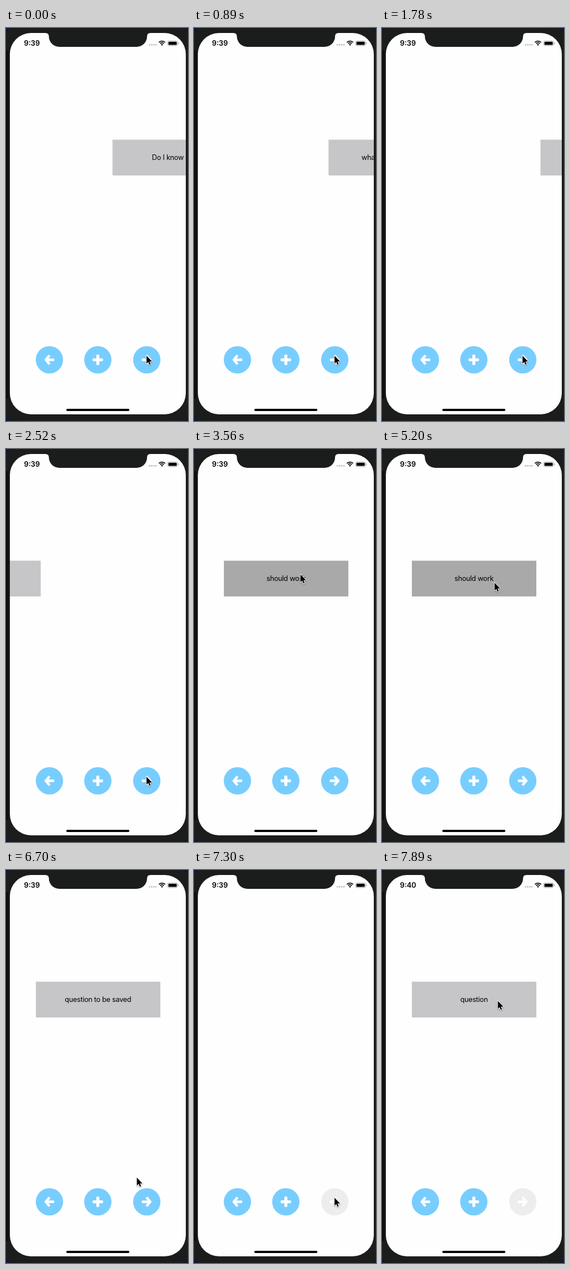
Animation of 329x709 px, one loop 8000 ms. Source, as an HTML page with a canvas:

```html
<!DOCTYPE html>
<html lang="en">
<head>
<meta charset="utf-8">
<title>Flash cards</title>
<style>
html, body { margin: 0; width: 100%; height: 100%; overflow: hidden; background: #1a1c1b; }
canvas { display: block; width: 329px; height: 709px; }
</style>
</head>
<body>
<canvas id="stage"></canvas>
<script>
const W = 329, H = 709, LOOP = 8000;
const canvas = document.getElementById('stage');
const ctx = canvas.getContext('2d');
const dpr = window.devicePixelRatio || 1;
canvas.width = W * dpr;
canvas.height = H * dpr;

const FONT = 'Inter, Roboto, sans-serif';
const BLUE = '#78cdff', GREY = '#ededed', WHITE = '#fefefe';
const REST_X = 54, TRAVEL = 318, SLIDE = 300;

const cards = ['Do I know you', 'what is your name', 'how are you', 'question to be saved', 'question'];
const ANSWER = 'should work';
const clicks = [455, 1370, 2340, 6950];
// Each tap: press time, time the card flips
const taps = [[3410, 3410], [4010, 4160], [4900, 5050], [5800, 5950]];
// Cursor tip: time, x, y
const path = [
  [0, 253.5, 590.5], [2750, 253.5, 590.5], [3080, 192, 225.5], [3560, 192, 225.5],
  [4250, 203, 240.5], [6130, 203, 240.5], [6690, 236, 554], [6850, 253.5, 590.5],
  [7400, 253.5, 590.5], [7850, 209, 235.5]
];

// The picture advances about every 150 ms, with a few shorter holds
const shortHolds = [0, 10, 14, 20, 28, 50];
const ticks = [];
for (let i = 0, t = 0; t < LOOP; i++) {
  ticks.push(t);
  t += shortHolds.includes(i) ? 140 : 150;
}
const hold = t => ticks.filter(s => s <= t).pop();

const clamp = v => Math.min(1, Math.max(0, v));
const ease = v => v < 0.5 ? 2 * v * v : 1 - 2 * (1 - v) * (1 - v);

function box(x, y, w, h, r, fill) {
  ctx.beginPath();
  ctx.roundRect(x, y, w, h, r);
  ctx.fillStyle = fill;
  ctx.fill();
}

function disc(x, y, r, fill) {
  ctx.beginPath();
  ctx.arc(x, y, r, 0, Math.PI * 2);
  ctx.fillStyle = fill;
  ctx.fill();
}

function poly(points, dx = 0, dy = 0) {
  ctx.beginPath();
  points.forEach(([x, y]) => ctx.lineTo(x + dx, y + dy));
}

function drawPhone() {
  ctx.fillStyle = '#0d1836';
  ctx.fillRect(0, 0, W, H);
  box(-4, -4, W + 8, H + 8, 26, '#1b1d1c');
  const side = ctx.createLinearGradient(0, 0, 7, 0);
  side.addColorStop(0, '#060707');
  side.addColorStop(1, '#1b1d1c');
  ctx.fillStyle = side;
  ctx.fillRect(0, 40, 7, H - 80);
  box(7, 9, 318, 688, 38, WHITE);
}

function drawNotch() {
  ctx.beginPath();
  ctx.moveTo(71, 8);
  ctx.lineTo(71, 9);
  ctx.quadraticCurveTo(77.5, 9, 77.5, 15);
  ctx.arcTo(77.5, 34, 97, 34, 19);
  ctx.lineTo(236, 34);
  ctx.arcTo(255, 34, 255, 15, 19);
  ctx.quadraticCurveTo(255, 9, 261, 9);
  ctx.lineTo(261, 8);
  ctx.fillStyle = '#1b1d1c';
  ctx.fill();
}

function drawStatus(t) {
  ctx.fillStyle = '#000';
  ctx.font = '600 12.8px ' + FONT;
  ctx.letterSpacing = '0px';
  ctx.textAlign = 'left';
  ctx.fillText(t < 7400 ? '9:39' : '9:40', 32.5, 32);

  for (let i = 0; i < 4; i++) disc(259.4 + i * 3.9, 30.3, 1.5, '#c2c2c2');

  ctx.strokeStyle = '#000';
  ctx.lineWidth = 1.8;
  ctx.lineCap = 'butt';
  for (const r of [8, 5]) {
    ctx.beginPath();
    ctx.arc(282, 31.6, r, -Math.PI * 0.75, -Math.PI * 0.25);
    ctx.stroke();
  }
  ctx.beginPath();
  ctx.moveTo(282, 32);
  ctx.arc(282, 31.6, 2.6, -Math.PI * 0.75, -Math.PI * 0.25);
  ctx.fillStyle = '#000';
  ctx.fill();

  ctx.beginPath();
  ctx.roundRect(292.2, 23.3, 17.8, 8.6, 2.4);
  ctx.strokeStyle = '#a5a5a5';
  ctx.lineWidth = 0.9;
  ctx.stroke();
  box(293.6, 24.7, 15, 5.8, 1.2, '#000');
  box(310.9, 26.1, 1.3, 3, 0.7, '#a5a5a5');
}

function cardState(t) {
  let index = 0, x = REST_X + TRAVEL * (1 - ease(clamp((t + 160) / SLIDE)));
  for (const c of clicks) {
    if (t < c) break;
    const leaving = t < c + SLIDE;
    if (!leaving) index++;
    x = leaving
      ? REST_X - TRAVEL * ease((t - c) / SLIDE)
      : REST_X + TRAVEL * (1 - ease(clamp((t - c - SLIDE) / SLIDE)));
  }
  const flipped = taps.filter(tap => tap[1] <= t).length % 2 === 1;
  const pressed = taps.some(([down, flip]) => t >= down && t < flip + 140);
  return { x, flipped, text: flipped ? ANSWER : cards[index], alpha: pressed ? 0.6 : 1 };
}

function drawCard(t) {
  const card = cardState(t);
  ctx.save();
  ctx.beginPath();
  ctx.rect(7, 190, 318, 90);
  ctx.clip();
  ctx.globalAlpha = card.alpha;
  ctx.fillStyle = card.flipped ? '#a9a9a9' : '#c6c6c8';
  ctx.fillRect(card.x, 201.5, 225, 64.5);
  ctx.fillStyle = '#000';
  ctx.font = '400 12.8px ' + FONT;
  ctx.letterSpacing = '-0.3px';
  ctx.textAlign = 'center';
  ctx.fillText(card.text, card.x + 112.3, 238);
  ctx.restore();
}

function drawArrow(x, y, dir) {
  ctx.save();
  ctx.translate(x, y);
  ctx.scale(dir, 1);
  ctx.strokeStyle = WHITE;
  ctx.lineWidth = 4.6;
  ctx.lineJoin = 'miter';
  ctx.lineCap = 'butt';
  poly([[-0.5, -8], [6.1, 0], [-0.5, 8]].map(([a, b]) => [a, b]));
  ctx.stroke();
  box(-9, -2.4, 15, 4.8, 1.4, WHITE);
  ctx.restore();
}

function drawPlus(x, y) {
  box(x - 9.3, y - 2.7, 18.6, 5.4, 1.3, WHITE);
  box(x - 2.7, y - 9.3, 5.4, 18.6, 1.3, WHITE);
}

function drawButtons(t) {
  const y = 598.6, r = 24.7;
  disc(78.5, y, r, BLUE);
  drawArrow(78.2, y, -1);
  disc(166, y, r, BLUE);
  drawPlus(166, y);

  const last = t >= clicks[3] + SLIDE;
  const press = clicks.map(c => Math.sin(Math.PI * clamp((t - c + 150) / 300)));
  ctx.save();
  ctx.globalAlpha = 1 - 0.6 * Math.max(...press);
  disc(254.5, y, r, last ? GREY : BLUE);
  drawArrow(254.5, y, 1);
  ctx.restore();
}

function cursorAt(t) {
  const i = path.findIndex(p => p[0] > t);
  if (i < 0) return path[path.length - 1].slice(1);
  const [t0, x0, y0] = path[i - 1], [t1, x1, y1] = path[i];
  const k = ease((t - t0) / (t1 - t0));
  return [x0 + (x1 - x0) * k, y0 + (y1 - y0) * k];
}

function drawCursor(t) {
  const [x, y] = cursorAt(t);
  const shape = [[0.5, 0.8], [0.5, 15], [3.7, 12], [5.8, 17], [8, 16.1], [5.9, 11.2], [10.4, 11.1]];
  ctx.save();
  poly(shape, x, y);
  ctx.closePath();
  ctx.lineJoin = 'round';
  ctx.lineWidth = 2;
  ctx.strokeStyle = '#fff';
  ctx.shadowColor = 'rgba(0,0,0,0.4)';
  ctx.shadowBlur = 2 * dpr;
  ctx.shadowOffsetY = dpr;
  ctx.stroke();
  ctx.shadowColor = 'transparent';
  ctx.fillStyle = '#000';
  ctx.fill();
  ctx.restore();
}

function draw(t) {
  ctx.setTransform(dpr, 0, 0, dpr, 0, 0);
  drawPhone();
  drawNotch();
  drawStatus(t);
  drawCard(t);
  drawButtons(t);
  box(109, 687, 114, 4, 2, '#000');
  drawCursor(t);
}

let start;
function frame(now) {
  if (start === undefined) start = now;
  draw(hold((now - start) % LOOP));
  requestAnimationFrame(frame);
}
draw(0);
requestAnimationFrame(frame);
</script>
</body>
</html>
```
